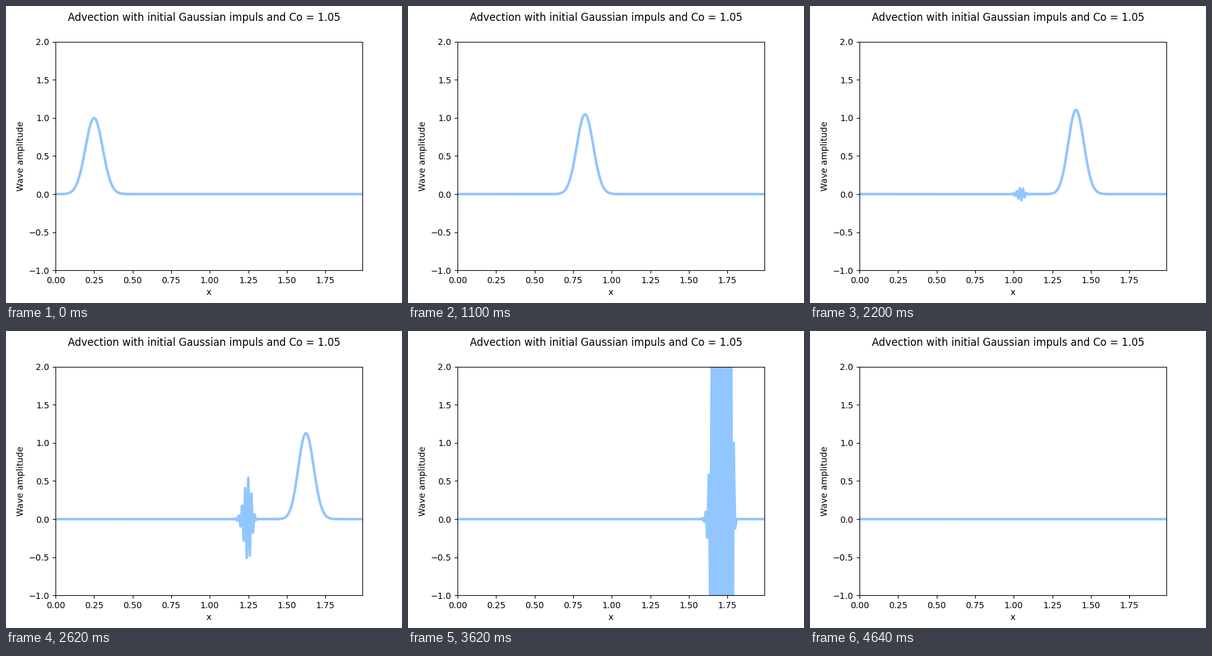
These frames come from a looping animation (640 px wide and 480 px high, 6 s). A matplotlib script:

```python
import numpy as np
import matplotlib.pyplot as plt
from matplotlib.animation import FuncAnimation

FRAMES = 300
INTERVAL = 20    # ms
DX = 0.01
COURANT = 1.05   # slightly above the stability limit

x = np.arange(200) * DX


def upwind(u):
    """One first-order upwind step with a zero inflow boundary."""
    new = np.zeros_like(u)
    new[1:] = u[1:] - COURANT * (u[1:] - u[:-1])
    return new


waves = [np.exp(-160 * (x - 0.25) ** 2)]
for _ in range(FRAMES - 1):
    waves.append(upwind(waves[-1]))

fig, ax = plt.subplots(figsize=(6.4, 4.8), dpi=100)
fig.suptitle(f"Advection with initial Gaussian impuls and Co = {COURANT}")
ax.set_xlim(0, x[-1])
ax.set_ylim(-1, 2)
ax.set_xlabel("x")
ax.set_ylabel("Wave amplitude")
line, = ax.plot(x, waves[0], color="#92C6FF", lw=3)


def update(i):
    line.set_ydata(waves[i])
    return line,


anim = FuncAnimation(fig, update, frames=FRAMES, interval=INTERVAL,
                     repeat=True, repeat_delay=0)
plt.show()
```
